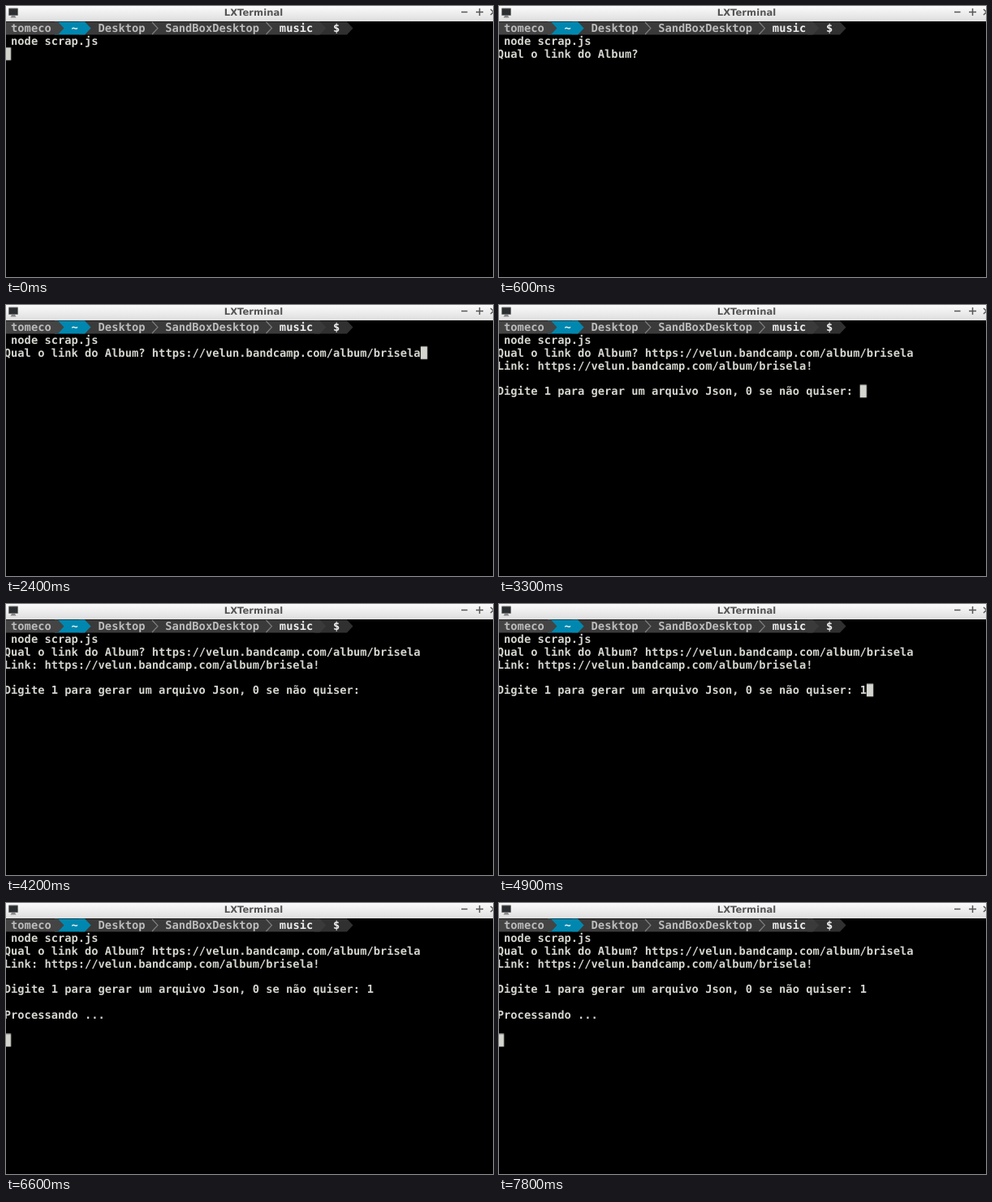
These frames come from a looping animation (600 px wide and 335 px high, 8000 ms). An HTML page:

```html
<!DOCTYPE html>
<html lang="pt">
<head>
<meta charset="utf-8">
<title>Terminal</title>
<style>
  html, body { margin: 0; width: 100%; height: 100%; overflow: hidden; background: #000; }
  svg { display: block; width: 600px; height: 335px; }
  text { white-space: pre; text-rendering: geometricPrecision; }
  .title { font: bold 11.6px "DejaVu Sans", sans-serif; fill: #555; text-anchor: middle; }
  .screen { font: bold 13.745px "DejaVu Sans Mono", monospace; fill: #d5d5cf; }
  .dim { fill: #bcbcbc; }
  .bright { fill: #eee; }

  /* Every change is a hard cut; 1% of the loop is 80 ms. */
  .ask, .url, .link, .choice, .busy, .cursor { animation: 8s step-end infinite; }
  .ask { animation-name: ask; }
  .url { animation-name: url; }
  .link { animation-name: link; }
  .choice { animation-name: choice; }
  .busy { animation-name: busy; }
  .cursor { animation-name: cursor; }

  @keyframes ask { 0% { opacity: 0 } 6.25% { opacity: 1 } }
  @keyframes url { 0% { opacity: 0 } 30% { opacity: 1 } }
  @keyframes link { 0% { opacity: 0 } 41.25% { opacity: 1 } }
  @keyframes choice { 0% { opacity: 0 } 58.75% { opacity: 1 } }
  @keyframes busy { 0% { opacity: 0 } 66.25% { opacity: 1 } }

  /* Cells are 8.275 by 15.8 px. */
  @keyframes cursor {
    0% { opacity: 1; transform: translate(0, 31.6px) }
    1.25% { opacity: 0 }
    8.75% { opacity: 1; transform: translate(182.05px, 31.6px) }
    22.5% { opacity: 0 }
    30% { opacity: 1; transform: translate(513.05px, 31.6px) }
    37.5% { opacity: 0 }
    41.25% { opacity: 1; transform: translate(446.85px, 79px) }
    48.75% { opacity: 0 }
    56.25% { opacity: 1 }
    58.75% { opacity: 1; transform: translate(455.1px, 79px) }
    66.25% { opacity: 1; transform: translate(0, 142.2px) }
    73.75% { opacity: 0 }
    81.25% { opacity: 1 }
    88.75% { opacity: 0 }
    96.25%, 100% { opacity: 1; transform: translate(0, 142.2px) }
  }
</style>
</head>
<body>
<svg viewBox="0 0 600 335">
  <defs>
    <linearGradient id="bar" x2="0" y2="1">
      <stop stop-color="#fbfbfb"/>
      <stop offset="1" stop-color="#dedede"/>
    </linearGradient>
  </defs>
  <rect width="600" height="335"/>

  <!-- Title bar -->
  <rect width="600" height="19" fill="url(#bar)"/>
  <rect x="3" y="2.5" width="12" height="9.5" rx="1" fill="#777"/>
  <rect x="4" y="3.5" width="10" height="7.5" fill="#2b2f31"/>
  <path d="M7 12h4l1.5 2.5h-7z" fill="#888"/>
  <text class="title" x="305" y="12.4">LXTerminal</text>
  <path d="M561 7.5h7.5M579 7.5h9M583.5 3v9M597 4l7 7m0-7l-7 7" fill="none" stroke="#555" stroke-width="1.5"/>

  <!-- Prompt segments, rightmost first -->
  <path d="M380 19.6h40l7.5 7.9-7.5 7.9h-40z" fill="#303030"/>
  <path d="M90 19.6h296.7l7.5 7.9-7.5 7.9H90z" fill="#3a3a3a"/>
  <path d="M60 19.6h37.1l7.5 7.9-7.5 7.9H60z" fill="#0087af"/>
  <path d="M0 19.6h64l7.5 7.9-7.5 7.9H0z" fill="#444"/>
  <path d="M180 20l7 7.5-7 7.5M320.5 20l7 7.5-7 7.5" fill="none" stroke="#808080" stroke-width="1.1"/>

  <g class="screen" transform="translate(-2.2 32.2)">
    <text class="dim"> tomeco   <tspan class="bright">~</tspan>   Desktop   SandBoxDesktop   <tspan class="bright">music   $</tspan></text>
    <text y="15.8"> node scrap.js</text>
    <text class="ask" y="31.6">Qual o link do Album?</text>
    <text class="url" x="182.05" y="31.6">https://velun.bandcamp.com/album/brisela</text>
    <g class="link">
      <text y="47.4">Link: https://velun.bandcamp.com/album/brisela!</text>
      <text y="79">Digite 1 para gerar um arquivo Json, 0 se não quiser:</text>
    </g>
    <text class="choice" x="446.85" y="79">1</text>
    <text class="busy" y="110.6">Processando ...</text>
    <rect class="cursor" y="-12.6" width="8.275" height="15.8"/>
  </g>
</svg>
</body>
</html>
```
